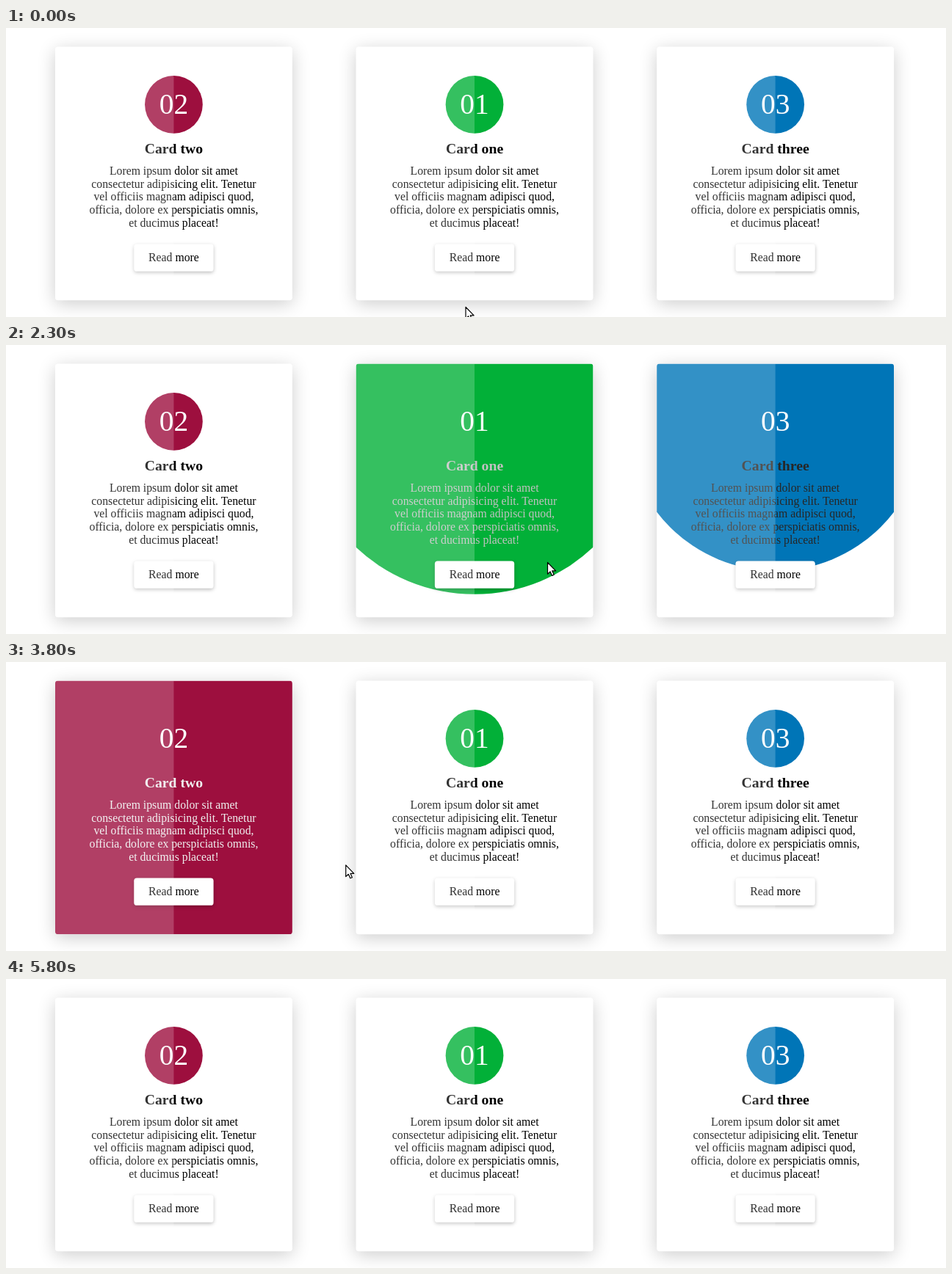
Animation, 1280 px wide and 394 px high, one loop 6.1 s. Source, as an HTML page:

```html
<!DOCTYPE html>
<html lang="en">
<head>
<meta charset="utf-8">
<title>Hover cards</title>
<style>
  html, body { margin: 0; width: 100%; height: 100%; overflow: hidden; background: #fff; }
  #stage {
    position: absolute; left: 0; top: 0; width: 1300px; height: 401px;
    transform: scale(calc(1280 / 1300)); transform-origin: 0 0;
    font: 16px/18px "Liberation Serif", serif; text-align: center;
  }
  .card {
    position: absolute; top: 26px; width: 328px; height: 351px;
    box-sizing: border-box; padding-top: 40px;
    border-radius: 4px; overflow: hidden; background: #fff;
    box-shadow: 0 5px 25px rgba(0, 0, 0, .2);
  }
  .card::after {
    content: ""; position: absolute; left: 0; top: 0; width: 50%; height: 100%;
    background: rgba(255, 255, 255, .2);
  }
  .fill { position: absolute; inset: 0; }
  .number, h2, p, .button { position: relative; }
  .number { height: 80px; font-size: 40px; line-height: 80px; color: #fff; }
  h2 { margin: 10px 0; font-size: 20px; line-height: 23px; }
  p { margin: 0 0 20px; white-space: nowrap; }
  .button {
    width: max-content; margin: 0 auto; padding: 10px 20px; border-radius: 4px;
    color: #000; background: #fff; box-shadow: 0 2px 5px rgba(0, 0, 0, .25);
  }
  #cursor { position: absolute; left: 0; top: 0; overflow: visible; }
</style>
</head>
<body>
<div id="stage"></div>
<svg id="cursor" width="14" height="20">
  <path d="M.5 .5V16.2L4.1 12.9L6.6 18.4L9.2 17.3L6.8 11.9H11.6Z"
        fill="#fff" stroke="#000" stroke-width="1.2" stroke-linejoin="round"/>
</svg>
<script>
const LOOP = 6100, TICK = 100;
const FILL_MS = 800, TEXT_MS = 500;
const SMALL_RADIUS = 40, FULL_RADIUS = 450;

// hovers: [enter, leave] times in ms
const cards = [
  { number: "02", name: "two", x: 68, color: "#9d0f3e", hovers: [[2890, 3762]] },
  { number: "01", name: "one", x: 484, color: "#02b038",
    hovers: [[471, 1229], [2071, 2843], [3808, 4780]] },
  { number: "03", name: "three", x: 900, color: "#0075b7", hovers: [[1272, 2025]] },
];

// [time, x, y] of the pointer tip; it is off the stage between the two paths
const pointerPaths = [
  [[0, 625.5, 380], [100, 622, 387], [199, 622, 387]],
  [[400, 625, 386], [600, 625, 358], [1130, 625, 358], [1300, 937, 325],
   [1998, 937, 325], [2105, 737, 296], [2703, 737, 296], [2972, 237, 277],
   [3680, 237, 277], [3883, 618, 276], [4780, 618, 276]],
];

const stage = document.getElementById("stage");
const cursor = document.getElementById("cursor");

for (const card of cards) {
  card.element = document.createElement("div");
  card.element.className = "card";
  card.element.style.left = card.x + "px";
  card.element.innerHTML = `
    <div class="fill" style="background:${card.color}"></div>
    <div class="number">${card.number}</div>
    <h2>Card ${card.name}</h2>
    <p>Lorem ipsum dolor sit amet<br>consectetur adipisicing elit. Tenetur<br>
      vel officiis magnam adipisci quod,<br>officia, dolore ex perspiciatis omnis,<br>
      et ducimus placeat!</p>
    <div class="button">Read more</div>`;
  card.fill = card.element.querySelector(".fill");
  stage.append(card.element);
}

const mix = (a, b, k) => a + (b - a) * k;

// CSS "ease": cubic-bezier(.25, .1, .25, 1)
function ease(x) {
  if (x <= 0) return 0;
  if (x >= 1) return 1;
  const bezier = (a, b, s) => 3 * a * s * (1 - s) ** 2 + 3 * b * s * s * (1 - s) + s ** 3;
  let low = 0, high = 1;
  for (let i = 0; i < 24; i++) {
    const mid = (low + high) / 2;
    if (bezier(.25, .25, mid) < x) low = mid; else high = mid;
  }
  return bezier(.1, 1, low);
}

function hoverAmount(hovers, time, duration) {
  return Math.max(...hovers.map(([enter, leave]) => time < leave
    ? ease((time - enter) / duration)
    : 1 - ease((time - leave) / duration)));
}

function pointerAt(time) {
  const path = pointerPaths.find(p => time >= p[0][0] && time <= p[p.length - 1][0]);
  if (!path) return null;
  const i = path.findIndex(p => p[0] >= time);
  const to = path[i], from = path[Math.max(0, i - 1)];
  const k = to === from ? 0 : (time - from[0]) / (to[0] - from[0]);
  return [mix(from[1], to[1], k), mix(from[2], to[2], k)];
}

function draw(time) {
  for (const { element, fill, hovers } of cards) {
    const radius = mix(SMALL_RADIUS, FULL_RADIUS, hoverAmount(hovers, time, FILL_MS));
    const gray = 255 * hoverAmount(hovers, time, TEXT_MS);
    fill.style.clipPath = `circle(${radius}px at 50% 80px)`;
    element.style.color = `rgb(${gray}, ${gray}, ${gray})`;
  }
  const tip = pointerAt(time);
  cursor.style.display = tip ? "" : "none";
  if (tip) cursor.style.transform = `translate(${tip[0]}px, ${tip[1]}px)`;
}

const start = performance.now();
function frame() {
  const time = (performance.now() - start) % LOOP;
  draw(Math.floor(time / TICK) * TICK);
  requestAnimationFrame(frame);
}
frame();
</script>
</body>
</html>
```
